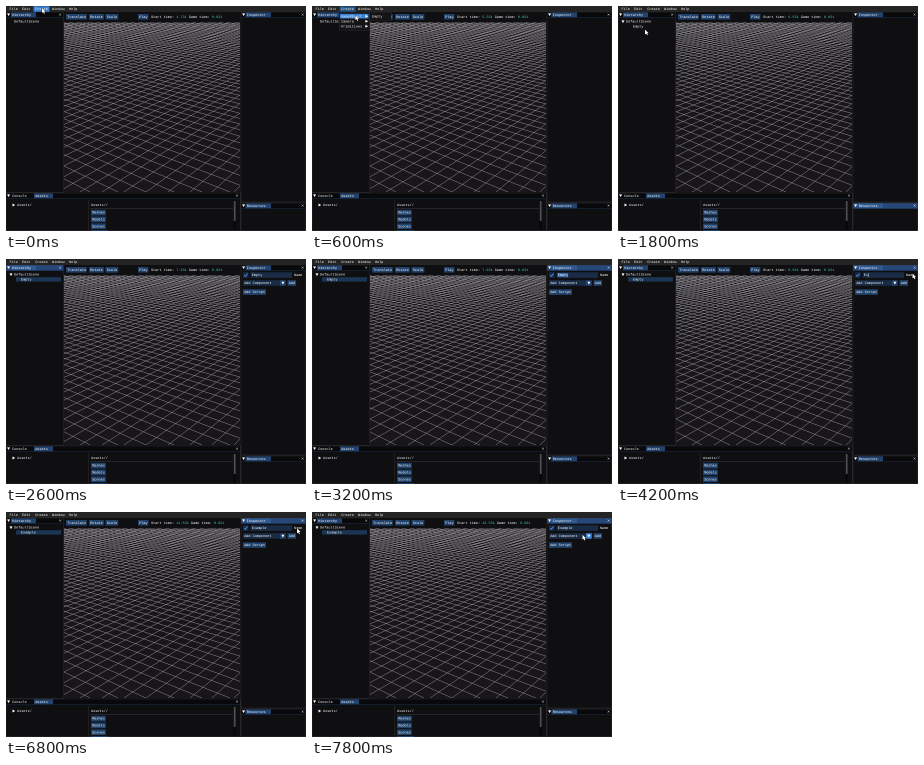
Recreate the animation shown at these times as an HTML page with a canvas. Size 300x225 px, loop 8 s.

```html
<!DOCTYPE html>
<html lang="en">
<head>
<meta charset="utf-8">
<title>Scene editor</title>
<style>
  html, body { margin: 0; width: 100%; height: 100%; overflow: hidden; background: #0f0e10; }
  canvas { display: block; width: 300px; height: 225px; }
</style>
</head>
<body>
<canvas id="stage" width="600" height="450"></canvas>
<script>
const ctx = document.getElementById('stage').getContext('2d');
const LOOP = 8000, STEP = 200, CHAR = 2.1;
const COLOR = {
  panel: '#0f0e10', bar: '#09090b', focus: '#264778', tab: '#22436e', tabFocus: '#30598f',
  button: '#20416a', hover: '#3a80d4', field: '#192b45', border: '#38383f',
  text: '#ffffff', time: '#35dba6', scene: '#18161a', grid: '#a09ea3'
};

// Pointer positions: [ms, x, y]
const PATH = [
  [0, 36, 2], [200, 37, 3], [500, 39, 9], [800, 52, 9.5], [1000, 66, 9.5], [1200, 71, 9.5],
  [1400, 71, 10], [1800, 27, 23.5], [2200, 21, 20], [2400, 150, 22], [2600, 262, 15],
  [3300, 262, 15], [3600, 294.5, 14.5], [6600, 294.5, 14.5],
  [7200, 284, 20], [7600, 271, 23], [8000, 270, 22.5]
];

// Name field contents: [ms, text]
const TYPING = [
  [0, 'Empty'], [3400, ''], [4000, 'E'], [4200, 'Ex'], [4600, 'Exa'], [4800, 'Exam'],
  [5000, 'Examp'], [5200, 'Exampl'], [5400, 'Example']
];

function rect(x, y, w, h, color) {
  ctx.fillStyle = color;
  ctx.fillRect(x, y, w, h);
}

function text(str, x, y, color = COLOR.text) {
  ctx.font = '3.5px "Liberation Mono", monospace';
  ctx.textRendering = 'geometricPrecision';
  ctx.fillStyle = color;
  ctx.fillText(str, x, y);
}

function shape(points, fill, stroke) {
  ctx.beginPath();
  points.forEach(([x, y]) => ctx.lineTo(x, y));
  ctx.closePath();
  if (stroke) {
    ctx.strokeStyle = stroke;
    ctx.lineWidth = 0.6;
    ctx.stroke();
  }
  ctx.fillStyle = fill;
  ctx.fill();
}

function line(x1, y1, x2, y2, color, width) {
  ctx.strokeStyle = color;
  ctx.lineWidth = width;
  ctx.beginPath();
  ctx.moveTo(x1, y1);
  ctx.lineTo(x2, y2);
  ctx.stroke();
}

const down = (x, y) => shape([[x - 1.5, y - 1.2], [x + 1.5, y - 1.2], [x, y + 1.5]], COLOR.text);
const right = (x, y) => shape([[x - 1.2, y - 1.5], [x + 1.5, y], [x - 1.2, y + 1.5]], COLOR.text);

function button(label, x, y, w, color = COLOR.button) {
  rect(x, y, w, 5.6, color);
  text(label, x + 1.2, y + 3.9);
}

function panel(x, y, w, h, focused) {
  rect(x, y, w, h, COLOR.panel);
  rect(x, y, w, 5.6, focused ? COLOR.focus : COLOR.bar);
  rect(x, y + 5.2, w, 0.3, focused ? COLOR.tabFocus : COLOR.tab);
  ctx.strokeStyle = COLOR.border;
  ctx.lineWidth = 0.4;
  ctx.strokeRect(x, y, w, h);
  down(x + 2.6, y + 2.6);
  const cx = x + w - 3.2, cy = y + 2.6;
  line(cx - 1, cy - 1, cx + 1, cy + 1, COLOR.text, 0.4);
  line(cx - 1, cy + 1, cx + 1, cy - 1, COLOR.text, 0.4);
}

function tab(label, x, y, w, focused) {
  rect(x, y + 0.4, w, 5, focused ? COLOR.tabFocus : COLOR.tab);
  text(label, x + 1.2, y + 3.9);
}

// Ground lines fan out from two vanishing points on the horizon.
function drawGrid() {
  const horizon = -60, base = 186;
  ctx.save();
  ctx.beginPath();
  ctx.rect(58, 16.5, 176, 169.5);
  ctx.clip();
  for (const [vanishX, gap] of [[-400, 28], [480, 22]]) {
    for (let x = -1400; x < 1800; x += gap) line(vanishX, horizon, x, base, COLOR.grid, 0.45);
  }
  ctx.restore();
}

function drawScene(t) {
  rect(57.6, 6, 177, 180.5, COLOR.panel);
  rect(58, 16.5, 176, 169.5, COLOR.scene);
  drawGrid();
  button('Translate', 60, 8, 20.8);
  button('Rotate', 83, 8, 14.8);
  button('Scale', 99.5, 8, 12.8);
  button('Play', 132, 8, 10.4);
  const start = (4.731 + t / 1000).toFixed(3);
  let x = 145;
  for (const [str, color] of [['Start time: '], [start + ' ', COLOR.time], ['Game time: '], ['0.021', COLOR.time]]) {
    text(str, x, 11.9, color);
    x += str.length * CHAR;
  }
}

function drawHierarchy(t) {
  const focused = t >= 2200 && t < 3000;
  panel(0, 6, 57.4, 180.5, focused);
  tab('Hierarchy', 5, 6, 25, focused);
  text('DefaultScene', 8, 16.7);
  if (t < 1400) return;
  down(5, 15.6);
  if (t >= 2200) rect(10, 18.2, 45, 4.4, '#1b3555');
  text(t < 6400 ? 'Empty' : 'Example', 15, 21.6);
}

function drawInspector(t) {
  const focused = t >= 3000;
  panel(235, 6, 64.8, 190, focused);
  tab('Inspector', 239.5, 6, 25.5, focused);
  if (t < 2200) return;
  rect(237, 13.3, 5.6, 5.6, COLOR.field);
  ctx.strokeStyle = '#4296fa';
  ctx.lineWidth = 0.8;
  ctx.beginPath();
  ctx.moveTo(238.2, 16);
  ctx.lineTo(239.4, 17.4);
  ctx.lineTo(241.6, 14.4);
  ctx.stroke();

  const name = TYPING.findLast(([from]) => t >= from)[1];
  rect(244.5, 13.3, 41.5, 5.6, COLOR.field);
  if (t >= 3000 && t < 3400) rect(245.6, 14, name.length * CHAR, 4.2, '#3666a6');
  text(name, 245.8, 17.2);
  if (t >= 3400 && t < 6400) rect(246 + name.length * CHAR, 14.1, 0.4, 4, COLOR.text);
  text('Name', 288, 17.2);

  rect(237, 21.2, 37.5, 5.6, COLOR.field);
  rect(274, 21.2, 5.8, 5.6, t >= 7400 ? COLOR.hover : COLOR.button);
  text('Add Component', 238.2, 25.1);
  down(276.9, 24);
  button('Add', 281.5, 21.2, 8.6);
  button('Add Script', 237, 30.3, 23);
}

function drawResources(t) {
  const focused = t >= 1400 && t < 2200;
  panel(235, 197, 64.8, 27.8, focused);
  tab('Resources', 239.5, 197, 25.5, focused);
}

function drawAssets() {
  panel(0, 187, 234.2, 37.8, false);
  text('Console', 6, 190.9);
  tab('Assets', 28, 187, 19, false);
  rect(82, 194, 0.4, 31, COLOR.border);
  right(7.7, 199);
  text('Assets/', 11, 200.1);
  text('Assets//', 85, 200.1);
  rect(84, 202, 143, 0.4, '#4a4a52');
  ['Meshes', 'Models', 'Scenes'].forEach((label, i) => button(label, 85, 203.8 + i * 6.8, 14.8));
  rect(85, 224, 17, 1, COLOR.button);
  rect(227.4, 194.6, 2.6, 29, '#08080a');
  rect(227.8, 195, 1.8, 20, '#4f4f54');
}

function drawMenu(t) {
  rect(0, 0, 300, 6, '#242425');
  const open = t >= 200 && t < 1400;
  if (t < 1400) rect(27.5, 0.2, 16, 5.6, open ? '#27517f' : COLOR.hover);
  [['File', 3.5], ['Edit', 16], ['Create', 29.2], ['Window', 46], ['Help', 63]]
    .forEach(([label, x]) => text(label, x, 4));
  if (!open) return;

  rect(27, 6, 30.4, 18.5, COLOR.border);
  rect(27.3, 6.2, 29.8, 18, '#141416');
  if (t >= 400) rect(28, 7.8, 28.5, 4.7, t < 1000 ? COLOR.hover : '#27517f');
  ['GameObject', 'Camera', 'Primitives'].forEach((label, i) => {
    text(label, 29.2, 11.4 + i * 5);
    right(54.6, 10.2 + i * 5);
  });
  if (t < 600) return;
  rect(57.4, 6.4, 22, 8.2, COLOR.border);
  rect(57.7, 6.7, 21.4, 7.6, '#141416');
  if (t >= 1000) rect(58.8, 8, 19.2, 5, COLOR.hover);
  text('Empty', 60, 11.6);
}

function drawPointer(t) {
  const overField = t >= 2600 && t < 3400;
  if (overField) return;
  const i = PATH.findIndex(([end]) => t < end);
  const [t0, x0, y0] = PATH[i - 1], [t1, x1, y1] = PATH[i];
  const k = (t - t0) / (t1 - t0);
  const x = x0 + (x1 - x0) * k, y = y0 + (y1 - y0) * k;
  shape([[0, 0], [0, 5], [1.2, 4], [2, 5.8], [2.9, 5.4], [2.1, 3.7], [3.6, 3.6]]
    .map(([dx, dy]) => [x + dx, y + dy]), '#fff', '#000');
}

function draw(now) {
  const t = Math.floor(now % LOOP / STEP) * STEP;
  ctx.setTransform(2, 0, 0, 2, 0, 0);
  rect(0, 0, 300, 225, COLOR.panel);
  drawScene(t);
  drawHierarchy(t);
  drawInspector(t);
  drawResources(t);
  drawAssets();
  drawMenu(t);
  drawPointer(t);
}

const began = performance.now();
function tick() {
  draw(performance.now() - began);
  requestAnimationFrame(tick);
}
tick();
</script>
</body>
</html>
```
